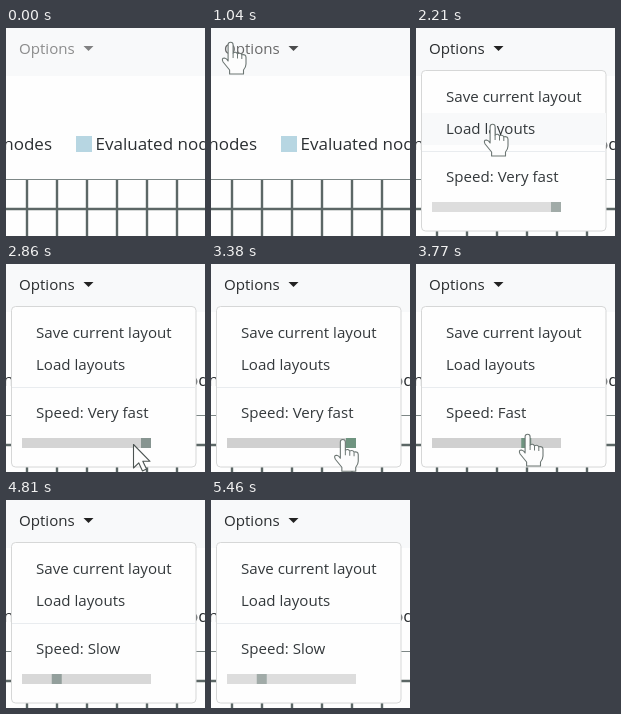
An HTML page for the animation above (6630 ms loop, 199x208 px).

```html
<!DOCTYPE html>
<html lang="en">
<head>
<meta charset="utf-8">
<title>Options menu</title>
<style>
  html, body { margin: 0; width: 100%; height: 100%; overflow: hidden; background: #fefefe; }
  svg { display: block; width: 100%; height: 100%; }
  text { font: 15.1px "Open Sans", "Noto Sans", sans-serif; fill: #33383b; }
  .legend text { font-size: 17px; fill: #2b2f32; }
  .grid { fill: none; stroke: #5c6766; stroke-width: 2.4; }
  .cursor path { fill: #fdfdfd; stroke: #4c5452; stroke-width: 1.1; stroke-linejoin: round; }
  .cursor #hand path { stroke: #6c7673; }
  .cursor .crease { fill: none; stroke-width: 1; }
</style>
</head>
<body>
<svg viewBox="0 0 199 208">
  <rect width="199" height="208" fill="#fefefe"/>
  <rect width="199" height="48" fill="#f8f9fa"/>
  <g class="legend">
    <text x="46" y="122" text-anchor="end">nodes</text>
    <rect x="70" y="108" width="16" height="16" fill="#b7d6e2"/>
    <text x="89.5" y="122">Evaluated nodes</text>
  </g>
  <path id="grid" class="grid"/>
  <path d="M0 151.5H199" stroke="#7d8786"/>

  <g id="menu">
    <rect x="5.5" y="42.5" width="184.5" height="160.5" rx="4" fill="#fefefe" stroke="#d6d7d7"/>
    <rect id="hover" x="6" width="184" height="32" fill="#f8f9fa"/>
    <text x="30" y="74">Save current layout</text>
    <text x="30" y="106">Load layouts</text>
    <path d="M6 123.5H190" stroke="#e9ecef"/>
    <text id="speed" x="30" y="154"></text>
    <g id="slider">
      <rect x="16" y="174" width="129" height="10" fill="#d0d0d0"/>
      <rect id="thumb" y="174" width="10" height="10"/>
    </g>
  </g>

  <g id="options">
    <text id="label" x="13" y="26">Options</text>
    <path id="caret" d="M77.5 18h10l-5 5z"/>
  </g>

  <g id="cursor" class="cursor">
    <path id="arrow" d="M.5 .5V24l5.3-5.1 3.7 8 4-1.8-3.7-7.8h7.2z"/>
    <g id="hand">
      <path d="M-2.9 17V1.7a2.5 2.5 0 0 1 5 0V10q2.6-1.8 4.4.8 3-1.4 4.3 1 4-.8 4.2 2.6V21q0 3-2.5 6v4H-1.4v-4l-6.5-8q-2-4 1.4-4 2 .4 3.6 3z"/>
      <path class="crease" d="M2.1 10v5M6.5 11v4.5M10.8 12v4"/>
    </g>
  </g>
</svg>
<script>
const LOOP = 6630, TICK = 130;
const OPEN = 1560, ENTER = 2730, GRAB = 3120, LEAVE = 4810;
const SPEEDS = ["Very slow", "Slow", "Intermediate", "Fast", "Very fast"];
const STEP = 119 / 4;

// Pointer path: time, x, y
const PATH = [
  [650, 150, 122], [910, 38, 36], [1040, 20, 15], [1690, 20, 15],
  [1950, 36, 46], [2470, 118, 148], [2600, 126, 168], [2730, 128, 178],
  [2860, 127, 180], [3120, 139, 178], [3250, 139, 178], [3770, 112, 171],
  [4030, 104, 171], [4420, 72, 169], [4550, 58, 170], [4680, 50, 172], [4810, 46, 176]
];

const $ = id => document.getElementById(id);
const clamp = (v, lo, hi) => Math.min(hi, Math.max(lo, v));
const show = (id, on) => $(id).setAttribute("visibility", on ? "inherit" : "hidden");

let lines = "M0 181H199";
for (let x = 21; x < 199; x += 30) lines += `M${x} 151V208`;
$("grid").setAttribute("d", lines);

function pointer(t) {
  const i = clamp(PATH.findIndex(p => p[0] > t), 1, PATH.length - 1);
  const [t0, x0, y0] = PATH[i - 1], [t1, x1, y1] = PATH[i];
  const k = clamp((t - t0) / (t1 - t0), 0, 1);
  return [x0 + (x1 - x0) * k, y0 + (y1 - y0) * k];
}

function draw(ms) {
  const t = Math.floor((ms % LOOP) / TICK) * TICK;
  const open = t >= OPEN;
  const visible = t >= PATH[0][0] && t < LEAVE;
  const [x, y] = pointer(t);

  const onLabel = visible && y < 32;
  const onItem = visible && open && y >= 53 && y < 117;
  const dragging = t >= GRAB && t < LEAVE;
  const hand = onLabel || onItem || dragging;
  show("cursor", visible);
  show("arrow", visible && !hand);
  show("hand", visible && hand);
  $("cursor").setAttribute("transform", `translate(${x} ${y})`);

  $("options").setAttribute("opacity", open ? 1 : onLabel ? 0.8 : 0.6);
  $("label").style.fill = open ? "#2a2d2f" : "#444";
  $("caret").setAttribute("fill", open || onLabel ? "#222" : "#333");

  show("menu", open);
  show("hover", onItem);
  $("hover").setAttribute("y", y < 85 ? 53 : 85);

  const value = t < GRAB ? 4 : clamp(Math.round((x - 21) / STEP), 1, 4);
  $("speed").textContent = "Speed: " + SPEEDS[value];
  $("thumb").setAttribute("x", 16 + value * STEP);
  $("thumb").setAttribute("fill", dragging ? "#6f9480" : "#7a8985");

  const fade = clamp((t - ENTER) / 200, 0, 1) - clamp((t - LEAVE + TICK) / 200, 0, 1);
  $("slider").setAttribute("opacity", 0.7 + 0.3 * fade);
}

const start = performance.now();
function frame() {
  draw(performance.now() - start);
  requestAnimationFrame(frame);
}
frame();
</script>
</body>
</html>
```
